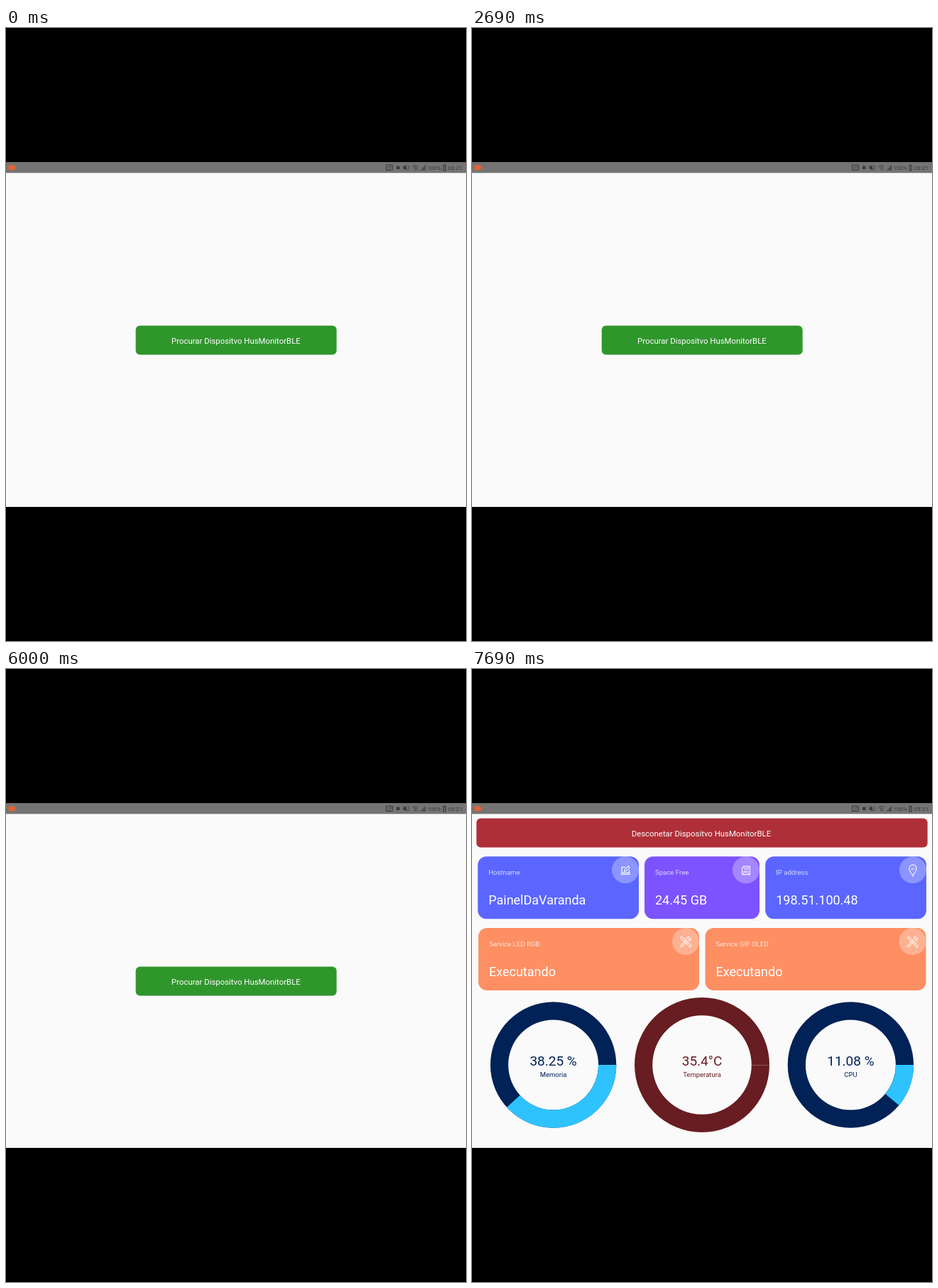
An HTML page with a canvas for the animation above (8 s loop, 648 px wide and 864 px high).

```html
<!DOCTYPE html>
<html lang="pt">
<head>
<meta charset="utf-8">
<title>Painel BLE</title>
<style>
html, body { margin: 0; width: 100%; height: 100%; overflow: hidden; background: #000; }
canvas { display: block; width: 648px; height: 864px; }
</style>
</head>
<body>
<canvas id="stage" width="648" height="864"></canvas>
<script>
const ctx = document.getElementById('stage').getContext('2d');
const LOOP = 8000, CONNECT = 6310, INFO = 6690, STATS = 7000;
const DEVICE = 'Dispositvo HusMonitorBLE';
const NAVY = '#002256', WINE = '#671d21', CYAN = '#2ec3ff';
const BLUE = '#5a66ff', VIOLET = '#7c53ff', ORANGE = '#fd8f63', INK = '#393939';

function rect(x, y, w, h, color) {
  ctx.fillStyle = color;
  ctx.fillRect(x, y, w, h);
}

function rounded(x, y, w, h, r, color) {
  ctx.fillStyle = color;
  ctx.beginPath();
  ctx.roundRect(x, y, w, h, r);
  ctx.fill();
}

function disc(x, y, r, color) {
  ctx.fillStyle = color;
  ctx.beginPath();
  ctx.arc(x, y, r, 0, Math.PI * 2);
  ctx.fill();
}

function text(str, x, y, size, color, align = 'left') {
  ctx.font = size + 'px Roboto, "Liberation Sans", sans-serif';
  ctx.textAlign = align;
  ctx.fillStyle = color;
  ctx.fillText(str, x, y);
}

function path(d, color, width) {
  const p = new Path2D(d);
  if (width) {
    ctx.strokeStyle = color;
    ctx.lineWidth = width;
    ctx.stroke(p);
  } else {
    ctx.fillStyle = color;
    ctx.fill(p);
  }
}

function statusBar() {
  rect(0, 189, 648, 15.3, '#757473');
  path('M4.5 193.3H11L14.3 196.8L11 200.3H4.5Q3.5 200.3 3.5 199.3V194.3Q3.5 193.3 4.5 193.3Z', '#e2622f');
  // screen cast
  path('M535.5 193H544.5V200.5H535.5Z', INK, 1);
  path('M537 195L543 199M537 199A3 3 0 0 1 540 199.5M540 195H543V197', INK, 0.8);
  rect(550, 194.5, 4.5, 4.5, INK);
  // muted speaker
  path('M559.5 195.3H561.3L564 193V200.8L561.3 198.5H559.5Z', INK);
  path('M559.5 193L566 200.5M567 193.5V200', INK, 0.8);
  // wifi
  path('M572.5 195.3Q576.5 191.8 580.5 195.3M574 197Q576.5 194.8 579 197', INK, 0.9);
  path('M575 198.2H578L576.5 200.5Z', INK);
  path('M579.2 197.5V200.5', INK, 0.8);
  for (let i = 0; i < 4; i++) rect(584.5 + i * 1.8, 199 - i * 1.9, 1.1, 1.8 + i * 1.9, INK);
  text('100%', 593.6, 199.8, 8, INK);
  path('M616.3 194H619.2V201H616.3Z', INK, 1.2);
  rect(616.8, 192.4, 2, 1.4, INK);
  text('03:21', 622.8, 199.8, 8.1, INK);
}

function button(x, y, w, color, label, textX, baseline) {
  rounded(x, y, w, 41, 6, color);
  text(label, textX, baseline, 11.4, '#fff');
}

// icons are drawn around 0,0
const icons = {
  laptop(c) {
    path('M0 -4.5H-5V3.5H5.5V0M-6.8 5.5H7', c, 1.3);
    path('M-1.5 1.5L-1 -1L4 -6L6 -4L1.2 1Z', c, 1.1);
  },
  floppy(c) {
    path('M-5.5 -3.5L-3.5 -5.8H5.5V5.8H-5.5Z', c, 1.1);
    path('M-2.8 -5.5V-1.8H3.5V-5.5M-.6 -5V-3M1.5 -5V-3M-3.3 5.5V1.2H3.3V5.5M-2 3H2', c, 0.9);
  },
  pin(c) {
    path('M0 8C-1.5 4 -5.2 1.5 -5.2 -2.5A5.2 5.2 0 0 1 5.2 -2.5C5.2 1.5 1.5 4 0 8Z', c, 1.1);
    text('IP', 0, 0, 6, c, 'center');
  },
  tools(c) {
    path('M-6 -7.5L-7.5 -6L-4.8 -3L1 2.5M-6 -7.5L-3 -5L2.5 .8M2 3.2L3.8 1.5L8 5.7L5.8 8Z', c, 1.1);
    path('M3 -1.2L-5.6 7.2Q-7.4 7.6 -7.2 5.4L1.3 -3Q.6 -7.2 5.2 -7.4L3.3 -5L5 -3.2L7.5 -5.2Q7.5 -.8 3 -1.2Z', c, 1.1);
  }
};

function card(x, y, w, color, title, value, icon) {
  rounded(x, y, w, 88, 12, color);
  const cx = x + w - 19, cy = y + 19;
  disc(cx, cy, 19, 'rgba(255,255,255,.3)');
  ctx.save();
  ctx.translate(cx, cy + 0.5);
  icons[icon](icon === 'tools' ? 'rgba(255,255,255,.75)' : 'rgba(255,255,255,.92)');
  ctx.restore();
  text(title, x + 15, y + 25.5, 9.6, 'rgba(255,255,255,.75)');
  text(value, x + 15, y + 68, 18, '#fff');
}

function slice(x, y, outer, inner, part, color) {
  const end = part * Math.PI * 2;
  ctx.fillStyle = color;
  ctx.beginPath();
  ctx.arc(x, y, outer, 0, end);
  ctx.arc(x, y, inner, end, 0, true);
  ctx.fill();
}

function gauge(x, outer, color, part, value, label) {
  const y = 558, inner = outer - 25.2;
  slice(x, y, outer, inner, 1, color);
  if (part) slice(x, y, outer, inner, part, CYAN);
  else rect(x + inner, y - 0.1, outer - inner, 0.7, 'rgba(255,255,255,.4)');
  text(value, x, 558.8, 19, color, 'center');
  text(label, x, 574.6, 9.5, color, 'center');
}

function dashboard(t) {
  const info = t >= INFO, stats = t >= STATS;
  const service = stats ? 'Executando' : '';
  button(6.3, 210.5, 635.4, '#af2f38', 'Desconetar ' + DEVICE, 224.7, 235.8);
  card(8.2, 264.3, 226.8, BLUE, 'Hostname', info ? 'PainelDaVaranda' : '', 'laptop');
  card(243, 264.3, 162, VIOLET, 'Space Free', info ? '24.45 GB' : '0 GB', 'floppy');
  card(413.2, 264.3, 226.8, BLUE, 'IP address', info ? '198.51.100.48' : '', 'pin');
  card(9, 365, 311, ORANGE, 'Service LED RGB', service, 'tools');
  card(328.5, 365, 311, ORANGE, 'Service GIF OLED', service, 'tools');
  const mem = stats ? 38.25 : 0, cpu = stats ? 11.08 : 0;
  gauge(114.6, 88.7, NAVY, mem / 100, mem + ' %', 'Memoria');
  gauge(324, 95, WINE, 0, stats ? '35.4°C' : '0°C', 'Temperatura');
  gauge(533.4, 88.7, NAVY, cpu / 100, cpu + ' %', 'CPU');
}

function draw(t) {
  rect(0, 0, 648, 864, '#000');
  rect(0, 204, 648, 471, '#fafafa');
  statusBar();
  if (t < CONNECT) button(182.7, 419.5, 283, '#2f962c', 'Procurar ' + DEVICE, 233, 444.6);
  else dashboard(t);
}

const start = performance.now();
function tick() {
  draw((performance.now() - start) % LOOP);
  requestAnimationFrame(tick);
}
tick();
</script>
</body>
</html>
```
